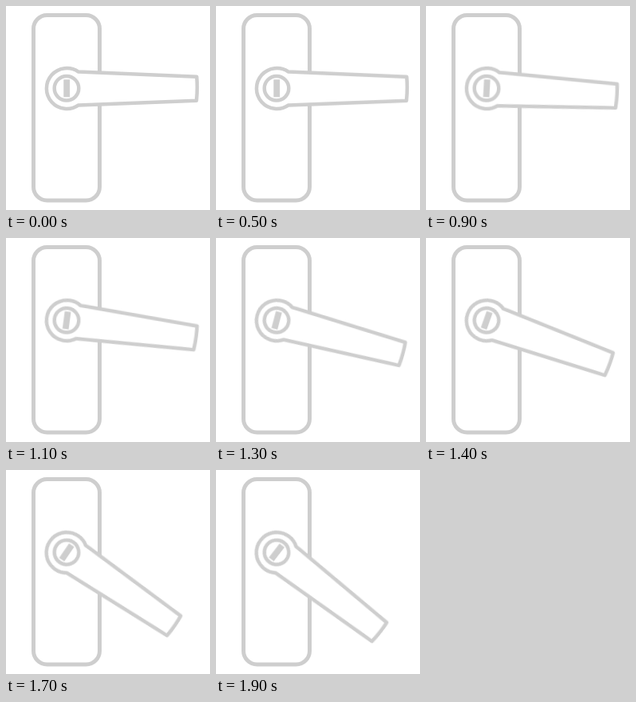
An HTML page for the animation above (2.4 s loop, 256 by 256 pixels).

```html
<!DOCTYPE html>
<html lang="en">
<head>
<meta charset="utf-8">
<title>Door handle</title>
<style>
  html, body { margin: 0; width: 100%; height: 100%; overflow: hidden; background: #fff; }
  svg { display: block; width: 100vw; height: 100vh; }
  .line { fill: #fff; stroke: #cecece; stroke-width: 4.5; stroke-linejoin: round; }
  .plate { stroke-width: 5; }
  .slot { fill: #cecece; }
  #lever { transform-origin: 76px 103.3px; }
</style>
</head>
<body>
<svg viewBox="0 0 256 256">
  <rect class="line plate" x="34.5" y="11.5" width="83" height="232.5" rx="17"/>
  <g id="lever">
    <path class="line" d="M91 82.6 L239.3 88.8 Q240.6 103.5 239 118.8 L91 124.4 A25.5 25.5 0 1 1 91 82.6 Z"/>
    <circle class="line" cx="76" cy="103.3" r="15.3"/>
    <rect class="slot" x="72.3" y="92.3" width="7.8" height="22"/>
  </g>
</svg>
<script>
  const LOOP = 2400, START = 500, STEP = 100;

  // Degrees turned at each step: slow start, quick middle, soft stop.
  const angles = [0.05, 0.3, 0.85, 1.8, 3.2, 5.1, 7.6, 10.8, 14.8, 19.5, 24.7, 30, 34.2, 36.8, 37.6];

  const pose = (deg, time) => ({
    transform: `rotate(${deg}deg)`,
    offset: time / LOOP,
    easing: 'steps(1, end)'
  });

  const frames = [
    pose(0, 0),
    ...angles.map((deg, i) => pose(deg, START + i * STEP)),
    pose(angles[angles.length - 1], LOOP)
  ];

  document.getElementById('lever').animate(frames, { duration: LOOP, iterations: Infinity });
</script>
</body>
</html>
```
